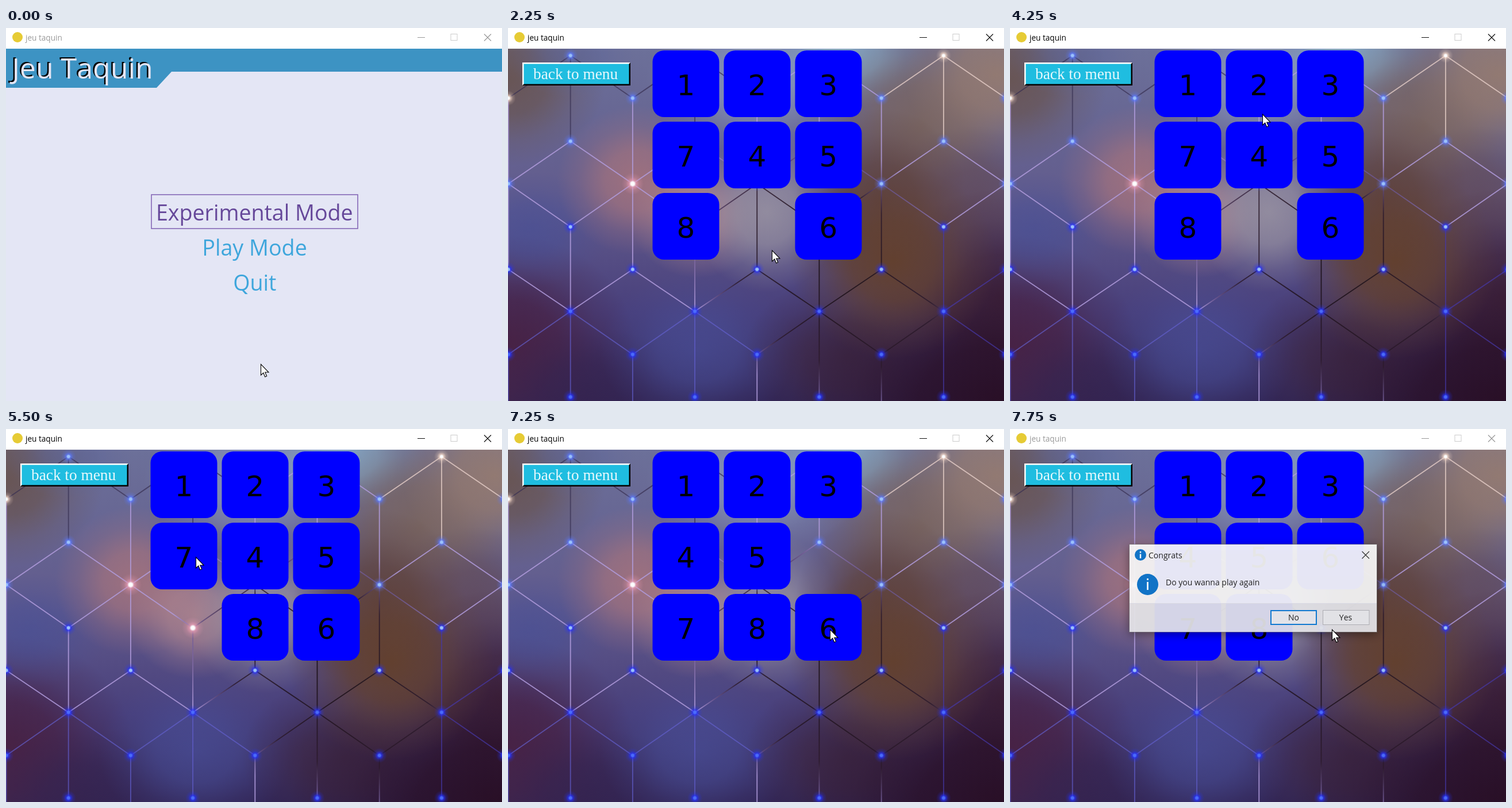
Write an HTML page that moves like this. It is 863 px wide and 649 px high and loops after 8 s.

```html
<!DOCTYPE html>
<html lang="fr">
<head>
<meta charset="utf-8">
<title>jeu taquin</title>
<style>
  html, body { margin: 0; width: 100%; height: 100%; overflow: hidden; background: #fff; }
  svg { display: block; width: 863px; height: 649px; }
  text { font-family: "Open Sans", "Noto Sans", sans-serif; font-kerning: none; white-space: pre; }
  .mid { text-anchor: middle; }
  .item { font-size: 37.6px; fill: #3ea6dc; }
  .digit { font: 50px "DejaVu Sans", sans-serif; }
  .back { font: 27.3px "Liberation Serif", "Times New Roman", serif; fill: #e6f8fc; }
  .small { font-size: 14px; fill: #222; }
  .line { fill: none; stroke-width: 1.9; }
</style>
</head>
<body>
<svg viewBox="0 0 863 649">
  <defs id="defs">
    <linearGradient id="base" x1="0" y1="0" x2="0" y2="1">
      <stop offset="0" stop-color="#6c7099"/>
      <stop offset=".45" stop-color="#615a8c"/>
      <stop offset=".75" stop-color="#483f7b"/>
      <stop offset="1" stop-color="#322656"/>
    </linearGradient>
    <radialGradient id="wire" gradientUnits="userSpaceOnUse" cx="0" cy="0" r="1"
                    gradientTransform="translate(560 430) rotate(38) scale(300 215)">
      <stop offset="0" stop-color="#170d13"/>
      <stop offset=".65" stop-color="#2c1a2c"/>
      <stop offset=".85" stop-color="#6d578f"/>
      <stop offset="1" stop-color="#b09bdc"/>
    </radialGradient>
    <filter id="soft" x="-20%" y="-30%" width="140%" height="160%">
      <feGaussianBlur stdDeviation="8"/>
    </filter>
  </defs>

  <g id="menu">
    <rect width="863" height="649" fill="#e4e6f5"/>
    <path d="M0 36H863V76H288L262 104H0Z" fill="#3d93c3"/>
    <g font-size="50">
      <text x="8" y="86">Jeu Taquin</text>
      <text x="10.5" y="88" fill="#e4e6f5">Jeu Taquin</text>
    </g>
    <rect x="253" y="290" width="359" height="59" fill="none" stroke="#7f5fb2" stroke-width="1.5"/>
    <text class="item mid" x="432.3" y="335" style="fill:#66489a">Experimental Mode</text>
    <text class="item mid" x="432.5" y="396">Play Mode</text>
    <text class="item mid" x="432.8" y="456.5">Quit</text>
  </g>

  <g id="game">
    <rect y="36" width="863" height="613" fill="url(#base)"/>
    <g id="scenery"></g>
    <g id="tiles"></g>
    <path d="M25 60H213V100H25Z" fill="#000"/>
    <path d="M25 60H213L210 63V97H28L25 100Z" fill="#fff"/>
    <path d="M27.5 62.5H210.5V97.5H27.5Z" fill="#1fbde0"/>
    <text class="back" x="44" y="89">back to menu</text>
  </g>

  <g id="dialog">
    <rect x="207" y="205" width="432" height="152" opacity=".4" filter="url(#soft)"/>
    <g opacity=".9">
      <rect x="208" y="201" width="430" height="152" fill="#fff"/>
      <rect x="208" y="303" width="430" height="50" fill="#ececf0"/>
    </g>
    <rect x="207.5" y="200.5" width="431" height="153" fill="none" stroke="#777" stroke-opacity=".6"/>
    <path d="M208 303.5H638" stroke="#d8d8e2"/>
    <g fill="#1173c6">
      <circle cx="227" cy="219" r="10"/>
      <circle cx="239.5" cy="270.5" r="18.5"/>
    </g>
    <path d="M227 217.5V225M227 213V215.5" stroke="#fff" stroke-width="2.4"/>
    <path d="M239.5 266V280M239.5 260V263" stroke="#fff" stroke-width="2.6"/>
    <text class="small" x="241" y="225">Congrats</text>
    <text class="small" x="271" y="272">Do you wanna play again</text>
    <path d="M612.5 213L625 225.5M625 213L612.5 225.5" stroke="#333" stroke-width="1.2"/>
    <rect x="454" y="316" width="79" height="24" fill="#e2e3e9" stroke="#1179d0" stroke-width="2"/>
    <rect x="544.5" y="315.5" width="80.5" height="25" fill="#e2e2e6" stroke="#adadb3"/>
    <text class="small mid" x="493.5" y="333">No</text>
    <text class="small mid" x="584" y="333">Yes</text>
  </g>

  <g>
    <rect width="863" height="36" fill="#fff"/>
    <circle cx="20" cy="16" r="9" fill="#e6cb35"/>
    <text id="caption" x="34" y="22" font-size="13.6">jeu taquin</text>
    <path id="controls" d="M716 16.5H729M832 10.5L844 22.5M844 10.5L832 22.5" stroke-width="1.2"/>
    <rect x="774" y="10.5" width="11" height="11" fill="none" stroke="#ccc"/>
  </g>

  <path id="cursor" d="M.5 1V20L4.8 16 7.700 23 10.700 21.700 7.800 15H14Z"
        fill="#fff" stroke="#000" stroke-width="1.1"/>
</svg>

<script>
const STEP = 250, LOOP = 8000;
const $ = id => document.getElementById(id);

function add(parent, tag, attrs, text) {
  const el = document.createElementNS("http://www.w3.org/2000/svg", tag);
  for (const name in attrs) el.setAttribute(name, attrs[name]);
  if (text !== undefined) el.textContent = text;
  parent.append(el);
  return el;
}

// stops: [offset, color, opacity]
let glowCount = 0;
function glow(cx, cy, rx, ry, stops) {
  const id = "glow" + glowCount++;
  const gradient = add($("defs"), "radialGradient", { id });
  for (const [offset, color, opacity] of stops)
    add(gradient, "stop", { offset, "stop-color": color, "stop-opacity": opacity });
  add($("scenery"), "ellipse", { cx, cy, rx, ry, fill: `url(#${id})` });
}

// Soft colour patches: x, y, rx, ry, colour, strength
const patches = [
  [0, 90, 170, 150, "#685452", .95],
  [110, 50, 110, 70, "#5c6498", .6],
  [0, 550, 220, 190, "#472245", 1],
  [140, 630, 180, 110, "#34234f", .7],
  [40, 350, 140, 100, "#454f98", .6],
  [430, 90, 190, 130, "#8b9ac2", .8],
  [590, 50, 140, 90, "#86aac8", .9],
  [720, 170, 190, 180, "#7a645c", .9],
  [850, 80, 160, 150, "#967b6f", .9],
  [810, 300, 160, 130, "#5f4858", .8],
  [225, 265, 140, 130, "#a8747c", .85],
  [330, 325, 120, 110, "#b5888e", .8],
  [450, 320, 130, 140, "#9a94a2", .85],
  [650, 300, 150, 160, "#5c403c", .9],
  [863, 470, 230, 190, "#3d2038", .95],
  [330, 560, 170, 140, "#4a53a0", .6],
  [590, 570, 180, 140, "#3d2640", .85],
  [863, 649, 370, 240, "#290f26", 1],
  [670, 405, 180, 170, "#62402f", 1]
];
for (const [x, y, rx, ry, color, a] of patches)
  glow(x, y, rx, ry, [[0, color, a], [.4, color, a * .78], [.72, color, a * .28], [1, color, 0]]);

// Cube lattice: even columns hold yEven nodes, odd columns yOdd nodes
const yEven = [122, 271, 420, 568], yOdd = [48, 197, 346, 493, 642];
const colX = i => 0.5 + i * 108.2;

function edge(x1, y1, x2, y2) {
  const mx = (x1 + x2) / 2, my = (y1 + y2) / 2;
  let stroke = "url(#wire)", opacity = .85;
  if (my < 125 && mx < 420) { stroke = "#383052"; opacity = .7; }
  else if (my < 130 && mx > 600) { stroke = "#e6cfc8"; opacity = .8; }
  else if (my > 480 && mx < 400) { stroke = "#6461d2"; opacity = .65; }
  else if (mx > 720 && my > 380) { stroke = "#4638a8"; opacity = .7; }
  // A tiny slant keeps the bounding box usable for painting
  add($("scenery"), "path", { class: "line", d: `M${x1} ${y1}L${x2 + .01} ${y2}`, stroke, opacity });
}

for (let i = 0; i < 9; i++) {
  const x = colX(i), uprights = i % 2
    ? [[48, 197], [346, 493], [493, 642]]
    : [[122, 271], [271, 420], [568, 660]];
  for (const [a, b] of uprights) edge(x, a, x, b);
  if (i === 8) break;
  for (const [even, odd] of [[122, 48], [271, 197], [271, 346], [420, 493], [568, 493]])
    edge(x, i % 2 ? odd : even, colX(i + 1), i % 2 ? even : odd);
}

for (let i = 0; i < 9; i++)
  for (const y of i % 2 ? yOdd : yEven) {
    const x = colX(i);
    const warm = (i === 2 && y === 271) || (i === 3 && y === 346);
    const pale = (i === 7 && y === 48) || (i === 0 && y === 122);
    const halo = warm ? "#e89bb4" : pale ? "#f4d8c8" : y > 320 ? "#2430ff" : "#5a78ff";
    const core = warm || pale ? "#fff" : y > 480 ? "#4a6cff" : "#9cc4ff";
    const r = warm ? 19 : 13;
    glow(x, y, r, r, [[0, core, 1], [.17, core, .95], [.32, halo, .75], [.6, halo, .25], [1, halo, 0]]);
  }

// Board: digit -> its start cell, then moves as [tick, digit, column, row]
const SIZE = 116, PITCH = 124;
const start = [1, 2, 3, 7, 4, 5, 8, 0, 6];
const moves = [[21, 8, 1, 2], [23, 7, 0, 2], [25, 4, 0, 1], [27, 5, 1, 1], [30, 6, 2, 1]];
const tiles = {};
start.forEach((digit, cell) => {
  if (!digit) return;
  const el = add($("tiles"), "g", {});
  add(el, "rect", { width: SIZE, height: SIZE, rx: 20, fill: "#00f" });
  add(el, "text", { class: "digit mid", x: SIZE / 2, y: 78 }, digit);
  tiles[digit] = { el, col: cell % 3, row: Math.floor(cell / 3) };
});

// Pointer track: tick, x, y
const track = [
  [0, 443, 584], [5, 459, 386], [10, 459, 386], [12, 400, 366], [13, 344, 338],
  [14, 390, 300], [15, 441, 265], [17, 439, 149], [18, 405, 200], [19, 345, 290],
  [20, 318, 333], [22, 330, 222], [23, 330, 222], [25, 432, 226], [27, 552, 230],
  [29, 560, 348], [32, 560, 348]
];

function pointerAt(tick) {
  const n = track.findIndex(key => key[0] > tick);
  const [t0, x0, y0] = track[n - 1], [t1, x1, y1] = track[n];
  const k = (tick - t0) / (t1 - t0);
  return [x0 + (x1 - x0) * k, y0 + (y1 - y0) * k];
}

const show = (id, on) => { $(id).style.display = on ? "" : "none"; };

function render(ms) {
  const tick = Math.floor((ms % LOOP) / STEP);
  const focused = tick >= 1 && tick < 30;
  show("menu", tick < 9);
  show("game", tick >= 9);
  show("dialog", tick >= 31);
  $("caption").setAttribute("fill", focused ? "#000" : "#999");
  $("controls").setAttribute("stroke", focused ? "#111" : "#999");
  $("cursor").setAttribute("transform", `translate(${pointerAt(tick)})`);
  for (const digit in tiles) {
    let { el, col, row } = tiles[digit];
    for (const [when, moved, c, r] of moves)
      if (moved == digit && tick >= when) [col, row] = [c, r];
    el.setAttribute("transform", `translate(${251.5 + col * PITCH} ${39 + row * PITCH})`);
  }
}

let origin;
function loop(now) {
  origin ??= now;
  render(Math.max(0, now - origin));
  requestAnimationFrame(loop);
}
render(0);
requestAnimationFrame(loop);
</script>
</body>
</html>
```
